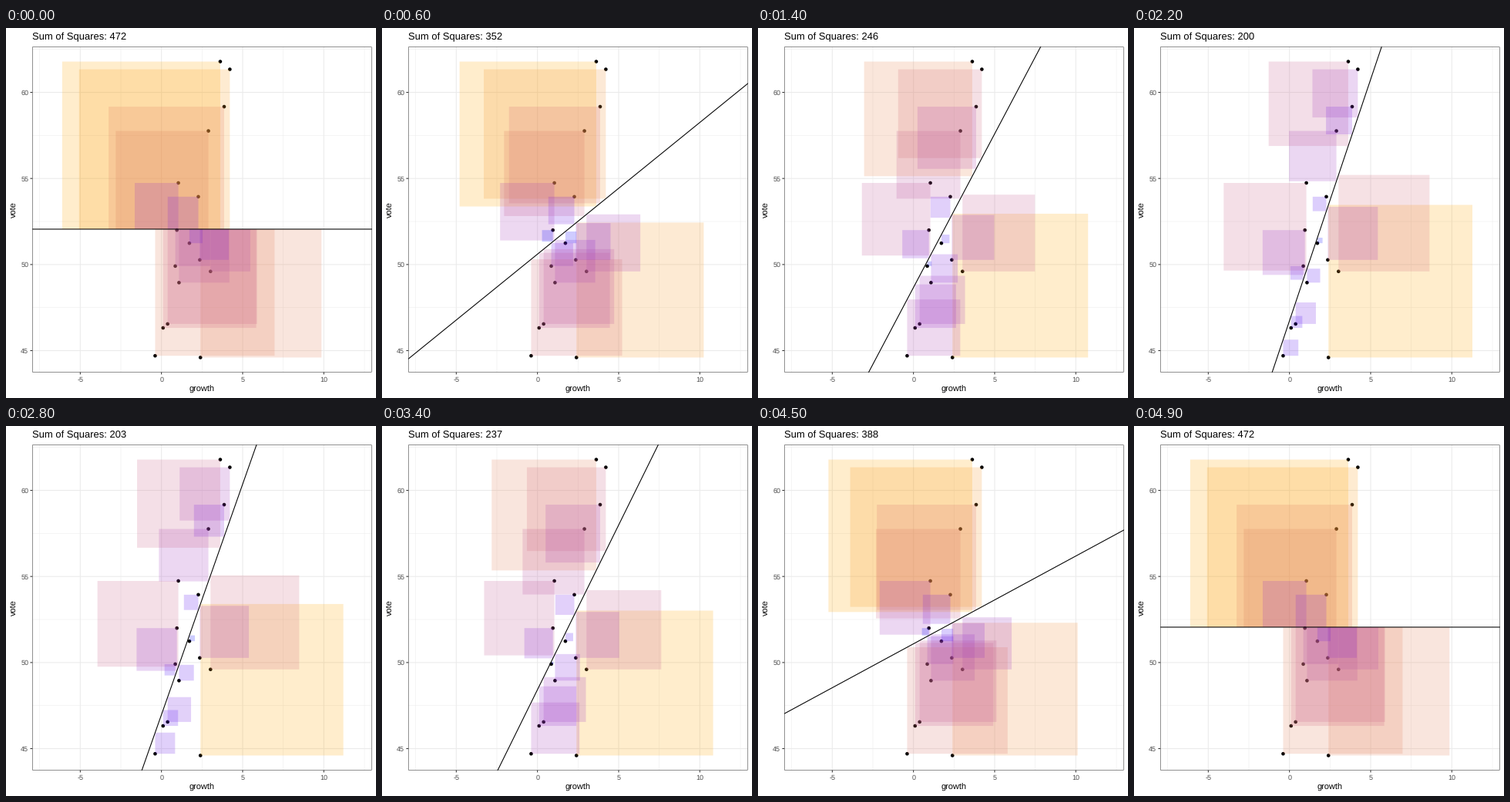
Animation of 480x480 px, one loop 5 s. Source, as a matplotlib script:

```python
import numpy as np
import matplotlib.pyplot as plt
from matplotlib.animation import FuncAnimation
from matplotlib.patches import Circle, Rectangle

plt.rcParams.update({"path.snap": False, "font.family": "Liberation Sans",
                     "text.hinting": "none"})

SIZE, FRAMES, INTERVAL = 480, 50, 100
LEFT, RIGHT, TOP, BOTTOM = 34.2, 474.5, 24.35, 446.65
LINE = 1.07
INK, TEXT, GRID = "#333333", "#4D4D4D", "#EBEBEB"

points = [(2.40, 44.60), (2.89, 57.76), (0.85, 49.91), (4.21, 61.34),
          (3.02, 49.60), (3.62, 61.79), (1.08, 48.95), (-0.39, 44.70),
          (3.86, 59.17), (2.27, 53.94), (0.38, 46.55), (1.04, 54.74),
          (2.36, 50.27), (1.72, 51.24), (0.10, 46.32), (0.95, 52.00)]
growth, vote = np.transpose(points)
best_slope = np.polyfit(growth, vote, 1)[0]


def expand(lo, hi):
    pad = 0.05 * (hi - lo)
    return lo - pad, hi + pad


X0, X1 = expand(-7, 12)
Y0, Y1 = expand(vote.min(), vote.max())
SX = (RIGHT - LEFT) / (X1 - X0)
SY = (BOTTOM - TOP) / (Y1 - Y0)


def px(x):
    return LEFT + (x - X0) * SX


def py(y):
    return BOTTOM - (y - Y0) * SY


def ramp(t):
    """Perceptual blend from blue through pink to orange."""
    return t ** 0.4, 0.647 * t ** 0.92, (1 - t) ** 0.76


fig = plt.figure(figsize=(SIZE / 72, SIZE / 72), dpi=72, facecolor="white")
ax = fig.add_axes([0, 0, 1, 1])
ax.set(xlim=(0, SIZE), ylim=(SIZE, 0))
ax.axis("off")


def seg(xs, ys, color, width, z):
    return ax.plot(xs, ys, color=color, lw=width, zorder=z,
                   solid_capstyle="butt")[0]


def label(x, y, s, size, color="black", ha="center", **kw):
    return ax.text(x, y, s, fontsize=size, color=color, ha=ha,
                   va="baseline", **kw)


def grid(xs, ys, width):
    for x in xs:
        seg([px(x)] * 2, [TOP, BOTTOM], GRID, width, 1)
    for y in ys:
        seg([LEFT, RIGHT], [py(y)] * 2, GRID, width, 1)


x_ticks, y_ticks = range(-5, 11, 5), range(45, 61, 5)
grid(np.arange(-7.5, 13, 5), np.arange(47.5, 63, 5), LINE / 2)
grid(x_ticks, y_ticks, LINE)

for x in x_ticks:
    seg([px(x)] * 2, [BOTTOM, BOTTOM + 2.75], INK, LINE, 5)
    label(px(x), 459, str(x), 9, TEXT)
for y in y_ticks:
    seg([LEFT - 2.75, LEFT], [py(y)] * 2, INK, LINE, 5)
    label(LEFT - 4.95, py(y) + 3.3, str(y), 9, TEXT, "right")

# Only the inner half of the border stroke shows
inset = LINE / 4
ax.add_patch(Rectangle((LEFT + inset, TOP + inset), RIGHT - LEFT - 2 * inset,
                       BOTTOM - TOP - 2 * inset, fill=False, ec=INK,
                       lw=LINE / 2, zorder=6))

label((LEFT + RIGHT) / 2, 472, "growth", 11)
label(13, (TOP + BOTTOM) / 2, "vote", 11, rotation=90, rotation_mode="anchor")
title = label(LEFT, 15, "", 13, ha="left")

for x, y in points:
    ax.add_patch(Circle((px(x), py(y)), 2.3, fc="black", lw=0, zorder=2))
squares = [ax.add_patch(Rectangle((0, 0), 0, 0, lw=0, alpha=0.2, zorder=3))
           for _ in points]
fit = seg([], [], "black", LINE, 4)
fit.set_clip_path(Rectangle((LEFT, TOP), RIGHT - LEFT, BOTTOM - TOP,
                            transform=ax.transData))


def update(i):
    step = min(i, FRAMES - 1 - i)
    slope = best_slope * step / (FRAMES / 2 - 1)

    def line(x):
        return vote.mean() + slope * (x - growth.mean())

    resid = vote - line(growth)
    dist = np.abs(resid)
    shade = (dist - dist.min()) / (dist.max() - dist.min())
    for sq, x, y, r, t in zip(squares, growth, vote, resid, shade):
        sq.set_bounds(px(x - r), py(y), r * SX, r * SY)
        sq.set_facecolor(ramp(t))
    ends = np.array([X0 - 1, X1 + 1])
    fit.set_data(px(ends), py(line(ends)))
    title.set_text(f"Sum of Squares: {np.sum(resid ** 2):.0f}")
    return [*squares, fit, title]


anim = FuncAnimation(fig, update, frames=FRAMES, interval=INTERVAL,
                     repeat=True, repeat_delay=0, blit=False)
plt.show()
```
